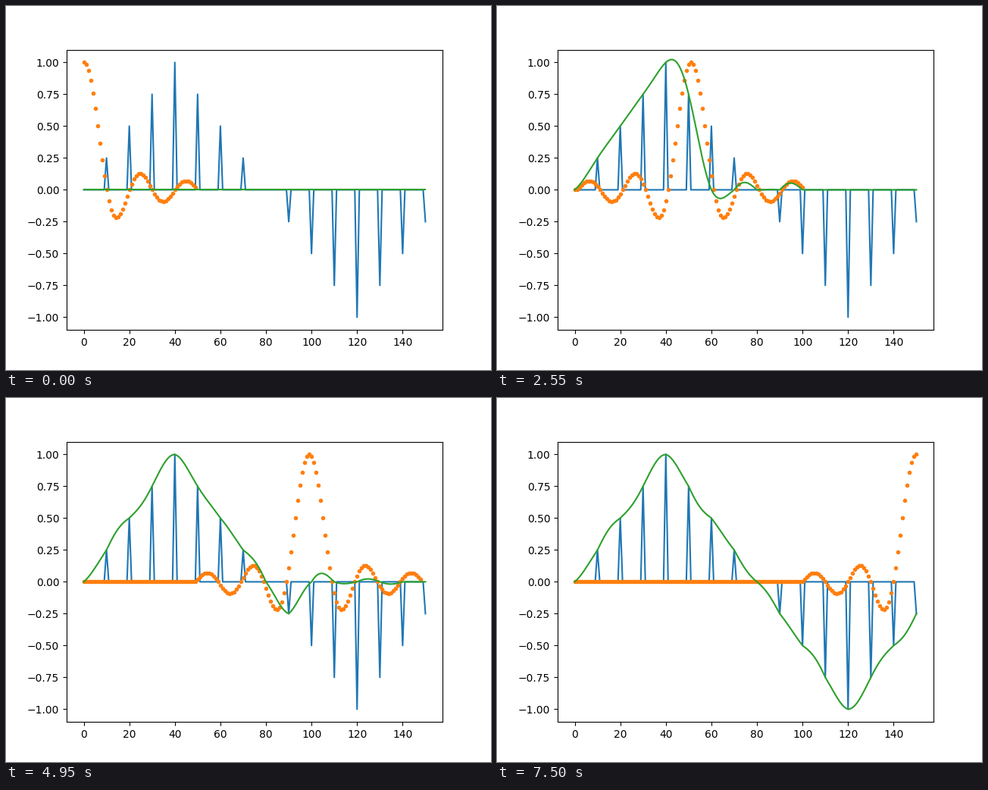
A matplotlib script that plays this animation: 640 px wide and 480 px high, repeating every 7.55 s.

```python
import numpy as np
import matplotlib.pyplot as plt
from matplotlib.animation import FuncAnimation

FRAMES = 151
STEP = 10    # distance between samples
REACH = 50   # half width of the sinc kernel

x = np.arange(FRAMES)
wave = np.interp(x, [0, 40, 120, 160], [0, 1, -1, 0])
samples = np.where(x % STEP == 0, wave, 0.0)


def kernel(center):
    d = x - center
    return np.where(np.abs(d) < REACH, np.sinc(d / STEP), 0.0)


# Row n holds the sum of all sample kernels up to position n.
rebuilt = np.cumsum([samples[n] * kernel(n) for n in x], axis=0)

fig, ax = plt.subplots(figsize=(6.4, 4.8), dpi=100)
ax.plot(x, samples, color="C0")
dots, = ax.plot([], [], ".", color="C1")
curve, = ax.plot([], [], color="C2")
ax.set_xlim(-7.5, 157.5)
ax.set_ylim(-1.1, 1.1)


def update(frame):
    n = frame - (frame % 3 == 2)  # every third step holds the one before
    end = n + REACH
    dots.set_data(x[:end], kernel(n)[:end])
    curve.set_data(x, rebuilt[n])
    return dots, curve


anim = FuncAnimation(fig, update, frames=FRAMES, interval=50, repeat=True,
                     repeat_delay=0)
plt.show()
```
